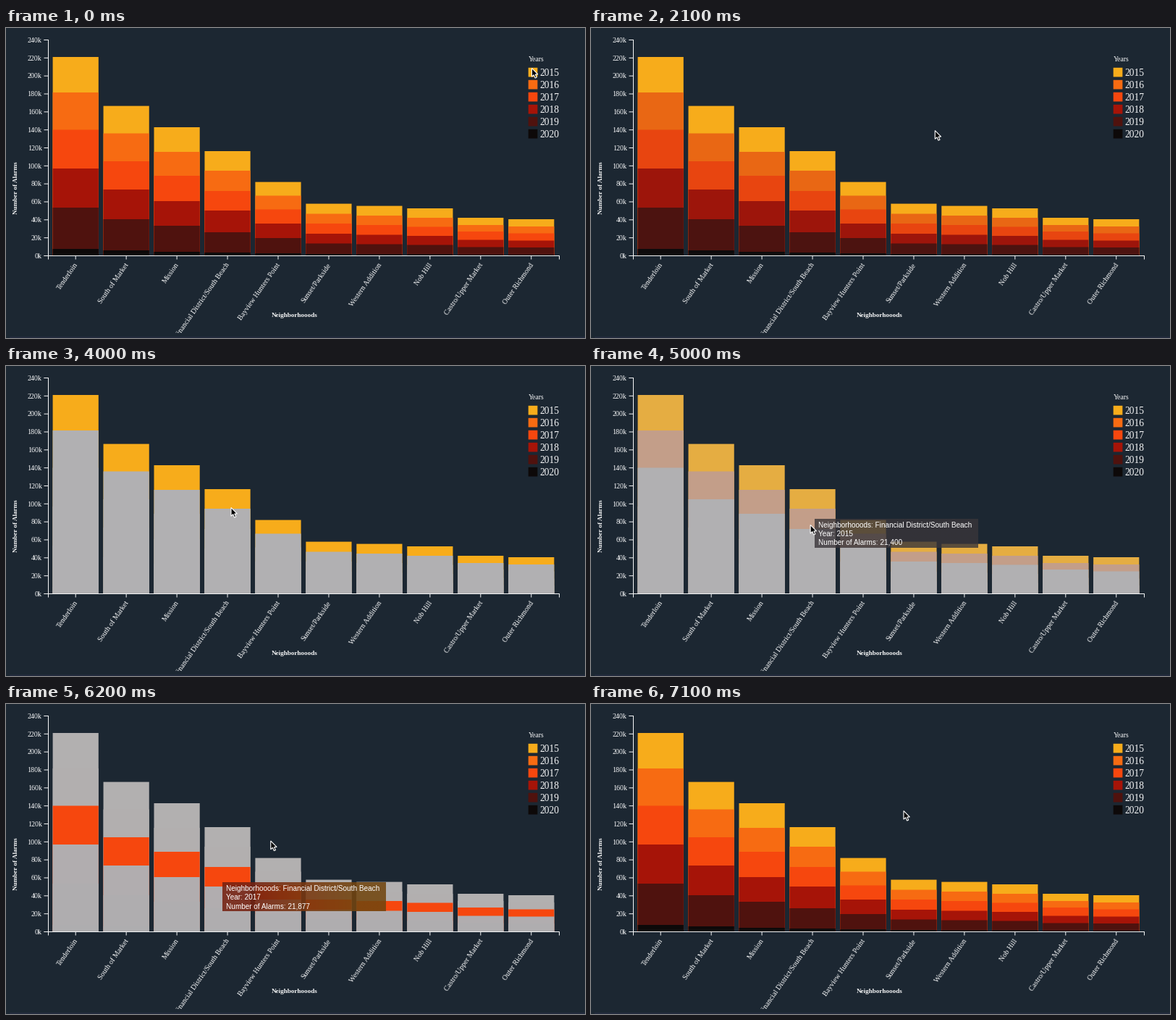
These frames come from a looping animation (800 px wide and 428 px high, 7.2 s). A matplotlib script:

```python
import numpy as np
import matplotlib.pyplot as plt
from matplotlib.animation import FuncAnimation
from matplotlib.patches import Polygon, Rectangle
from matplotlib.transforms import Bbox

W, H, DPI = 800, 428, 100
STEP, COUNT = 100, 72
SERIF, SANS = "Liberation Serif", "Liberation Sans"


def rgb(*c):
    return np.array(c) / 255


BG, INK, GRAY = rgb(28, 39, 50), rgb(244, 245, 246), rgb(177, 176, 178)
YEARS = range(2015, 2021)
COLORS = [rgb(247, 172, 27), rgb(247, 107, 18), rgb(246, 71, 14),
          rgb(166, 20, 8), rgb(79, 18, 14), rgb(13, 9, 9)]
BASE = 314.3
LEFT, PITCH, BAND = 64.6, 69.95, 63.2

# Segment tops in pixels, newest year last
BARS = {
    "Tenderloin": (40, 89, 140.5, 194, 248, 305),
    "South of Market": (107.6, 145.5, 184, 223, 264, 307),
    "Mission": (137, 171, 204, 239, 273, 309),
    "Financial District/South Beach": (170, 197, 225, 252, 282, 310),
    "Bayview Hunters Point": (212.6, 231.5, 250.5, 270, 290, 311),
    "Sunset/Parkside": (242.6, 256.5, 270, 284, 297.5, 312),
    "Western Addition": (245.6, 259, 272, 285.5, 298.5, 312.5),
    "Nob Hill": (249, 262, 274.5, 287, 299.5, 312.5),
    "Castro/Upper Market": (262, 272, 281, 292.5, 302.5, 313),
    "Outer Richmond": (264, 274, 283.5, 293.5, 303, 313),
}

# (time, mode, highlighted year index)
EVENTS = [(200, "dim", 0), (1750, "normal", 0), (2400, "gray", 0),
          (4800, "gray", 1), (5050, "gray", 2), (6120, "normal", 0)]
FADE = 500

# Cursor tip: (time, x, y)
PATH = [(0, 726.5, 55.5), (100, 726.5, 55.5), (700, 728.5, 58.5),
        (1700, 728.5, 58.5), (2400, 311, 195.5), (4750, 311, 195.5),
        (5150, 299.5, 230.5), (6000, 299.5, 230.5), (6400, 432, 147.5),
        (7200, 432, 147.5)]

fig = plt.figure(figsize=(W / DPI, H / DPI), dpi=DPI, facecolor=BG)
ax = fig.add_axes([0, 0, 1, 1])
ax.set_xlim(0, W)
ax.set_ylim(H, 0)
ax.axis("off")


def label(x, y, s, px, font=SERIF, **kw):
    return ax.text(x, y, s, fontsize=px * 72 / DPI, family=font,
                   **{"color": INK, "va": "baseline", **kw})


def line(xs, ys):
    ax.plot(xs, ys, color=INK, lw=0.72, zorder=3, solid_capstyle="butt",
            snap=False)


def box(x, y, w, h, color, **kw):
    return ax.add_patch(Rectangle((x, y), w, h, fc=color, ec="none", lw=0,
                                  snap=False, **kw))


def draw_axes():
    line([52.5, 58.5, 58.5, 52.5], [16.5, 16.5, 314.5, 314.5])
    for i in range(13):
        y = 314.5 - i * 298 / 12
        line([52.5, 58.5], [y, y])
        label(49.8, y + 3.3, f"{20 * i}k", 10, ha="right")
    line([58.5, 58.5, 764.5, 764.5], [319.5, 314.5, 314.5, 319.5])
    clip = Bbox([[0, H - 420.5], [W, H]])
    for i, name in enumerate(BARS):
        x = LEFT + BAND / 2 + PITCH * i
        line([x, x], [314.5, 319.5])
        t = label(x + 3.5, 326.7, name, 10, ha="right", rotation=55,
                  rotation_mode="anchor")
        t.set_clip_box(clip)
        t.set_clip_on(True)
    label(399, 399, "Neighborhooods", 9.1, ha="center", weight="bold")
    label(16, 220.5, "Number of Alarms", 9.1, ha="center", weight="bold",
          rotation=90, rotation_mode="anchor")


def draw_legend():
    label(722, 46, "Years", 9.8)
    for i, (year, color) in enumerate(zip(YEARS, COLORS)):
        box(721.7, 54.8 + 17 * i, 12.7, 12.7, color)
        label(737, 65.7 + 17 * i, str(year), 13.5)


def draw_bars():
    """Each segment runs down to the axis and hides the one behind it."""
    groups = [[] for _ in YEARS]
    for i, tops in enumerate(BARS.values()):
        for k, top in enumerate(tops):
            groups[k].append(box(LEFT + PITCH * i, top, BAND, BASE - top,
                                 COLORS[k], zorder=2))
    return groups


class Tip:
    """Hover box that pops in, lingers and fades away."""

    def __init__(self, x, y, year, alarms, shades, alpha, start, end):
        self.alpha, self.start, self.end = alpha, start, end
        self.fill = ax.imshow(np.array([shades]),
                              extent=(x, x + 225.5, y + 39.5, y),
                              interpolation="bilinear", aspect="auto", zorder=5)
        rows = ("Neighborhooods: Financial District/South Beach",
                f"Year: {year}", f"Number of Alarms: {alarms}")
        self.rows = [label(x + 5.5, y + 11 + 12 * i, s, 10.05, SANS, zorder=6,
                           color="white") for i, s in enumerate(rows)]

    def update(self, t):
        a = np.clip((t - self.start) / 100, 0, 1) * np.clip((self.end - t) / 300, 0, 1)
        self.fill.set_alpha(self.alpha * a)
        for row in self.rows:
            row.set_alpha(a)
            row.set_visible(a > 0)


def ease(p):
    p = min(max(p, 0), 1)
    return 4 * p ** 3 if p < 0.5 else 1 - 4 * (1 - p) ** 3


def target(k, mode, year):
    if mode == "normal" or k == year:
        return COLORS[k]
    return GRAY if mode == "gray" else BG + 0.42 * (COLORS[k] - BG)


def color_at(k, t):
    start, old, new = -FADE, COLORS[k], COLORS[k]
    for when, mode, year in EVENTS:
        goal = target(k, mode, year)
        if when > t or np.allclose(goal, new):
            continue
        old = old + (new - old) * ease((when - start) / FADE)
        start, new = when, goal
    return old + (new - old) * ease((t - start) / FADE)


def cursor_at(t):
    for (t0, *a), (t1, *b) in zip(PATH, PATH[1:]):
        if t <= t1:
            p = (t - t0) / (t1 - t0)
            p = p * p * (3 - 2 * p)
            return np.array(a) + (np.array(b) - np.array(a)) * p


draw_axes()
draw_legend()
bars = draw_bars()
box(5, 426, 795, 2, rgb(34, 43, 61))

ARROW = np.array([(0, 0), (0, 11.7), (2.7, 9.2), (4.6, 13.6), (6.7, 12.7),
                  (4.8, 8.5), (8.4, 8.5)])
cursor = ax.add_patch(Polygon(ARROW, closed=True, fc="black", ec="white",
                              lw=0.8, zorder=8, snap=False))
tips = [
    Tip(309, 211.7, 2015, "21,400", [rgb(58, 54, 58)] * 3, 0.8, 4200, 5750),
    Tip(298.5, 247, 2017, "21,877",
        [rgb(118, 34, 18), rgb(122, 56, 16), rgb(114, 70, 16)], 0.88, 5800, 6850),
]
ax.set_xlim(0, W)
ax.set_ylim(H, 0)


def draw(n):
    t = n * STEP
    for k, group in enumerate(bars):
        color = np.clip(color_at(k, t), 0, 1)
        for bar in group:
            bar.set_facecolor(color)
    cursor.set_xy(ARROW + cursor_at(t))
    for tip in tips:
        tip.update(t)


anim = FuncAnimation(fig, draw, frames=COUNT, interval=STEP, repeat=True,
                     repeat_delay=0)
plt.show()
```
